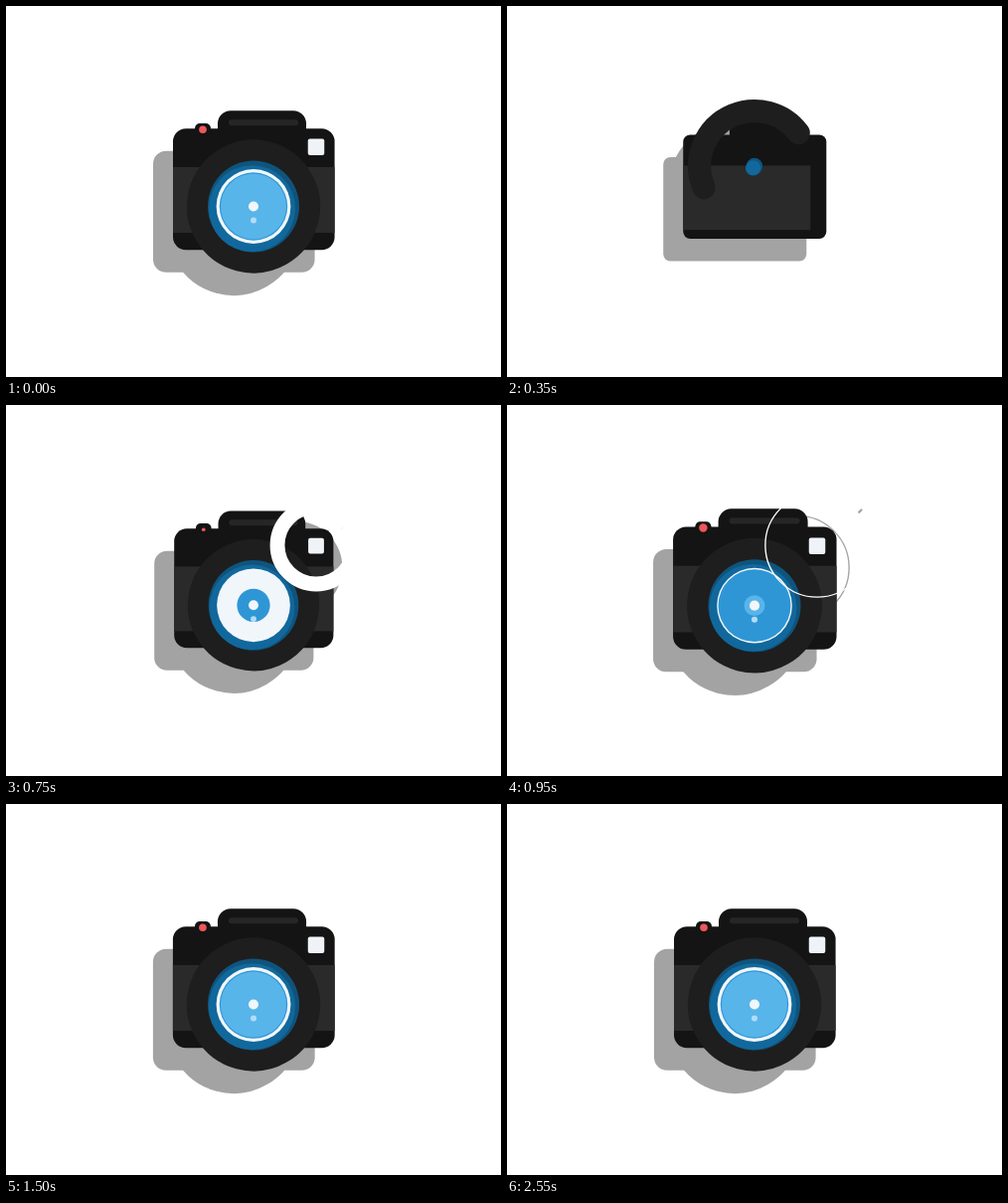
An HTML page for the animation above (2.6 s loop, 498 by 373 pixels).

```html
<!DOCTYPE html>
<html lang="en">
<head>
<meta charset="utf-8">
<title>Camera</title>
<style>
html, body { margin: 0; width: 100%; height: 100%; overflow: hidden; background: #fff; }
svg { display: block; width: 100vw; height: 100vh; }
</style>
</head>
<body>
<svg viewBox="0 0 498 373">
  <defs>
    <rect id="body" x="168" width="162.6"/>
    <g id="hump"><rect x="213" y="105.3" width="89" height="40" rx="13"/></g>
    <circle id="ring" cx="249" pathLength="360" stroke-linecap="round"/>
    <circle id="flash" cx="312" cy="141"/>
  </defs>

  <g transform="translate(-20 22.5)">
    <g class="camera" fill="#a3a3a3" stroke="none">
      <use href="#body"/>
      <use href="#hump"/>
      <use href="#ring" fill="none" stroke="#a3a3a3"/>
    </g>
    <use href="#flash" fill="none" stroke="#a3a3a3"/>
  </g>
  <path id="spark" stroke="#a3a3a3" stroke-linecap="round"/>

  <g class="camera">
    <use href="#hump" fill="#141414"/>
    <rect id="bar" x="224" y="114.3" width="70" height="6" rx="3" fill="#262626"/>
    <rect id="bump" x="190" y="118" width="16" height="14" rx="5" fill="#141414"/>
    <use href="#body" fill="#141414"/>
    <circle id="button" cx="198" cy="124.3" fill="#f0575a"/>
    <rect id="band" x="168" fill="#2a2a2a"/>
    <use href="#ring" fill="none" stroke="#1e1e1e"/>
    <g id="lens">
      <circle id="rim" fill="#0f547d"/>
      <circle id="rimLow" cx="-1.5" cy="2.2" fill="#11689c"/>
      <circle id="glass" fill="#f1f6fa"/>
      <circle id="mid" fill="#2f96d6"/>
      <circle id="light" fill="#57b5ea"/>
      <circle id="dot" fill="#f1f6fa"/>
      <circle id="dot2" cy="14" fill="#b3dcf5"/>
    </g>
  </g>
  <use href="#flash" fill="none" stroke="#fff"/>
  <rect id="window" fill="#eff3f7" rx="2"/>
</svg>
<script>
const LOOP = 2600, STEP = 50;
const $ = id => document.getElementById(id);
const cameras = document.querySelectorAll('.camera');

const linear = p => p;
const out = n => p => 1 - (1 - p) ** n;
const inOut = p => p < 0.5 ? 2 * p * p : 1 - 2 * (1 - p) ** 2;
const back = s => p => 1 + (s + 1) * (p - 1) ** 3 + s * (p - 1) ** 2;

// Eased progress from 0 to 1 that begins at start and lasts dur.
function ease(t, start, dur, curve = linear) {
  return curve(Math.min(1, Math.max(0, (t - start) / dur)));
}

const mix = (a, b, p) => a + (b - a) * p;

function set(id, attrs) {
  for (const name in attrs) $(id).setAttribute(name, attrs[name]);
}

function scaleAt(x, y, sx, sy = sx) {
  return `translate(${x} ${y}) scale(${sx} ${sy}) translate(${-x} ${-y})`;
}

function wobble(t) {
  const age = Math.max(0, t - 600);
  return 0.054 * Math.exp(-age / 235) * Math.sin(age * Math.PI / 250);
}

function drawBody(t) {
  const size = ease(t, 150, 665, back(1.55)) - wobble(t);
  cameras.forEach(c => c.setAttribute('transform', scaleAt(249, 187, size)));

  const settle = ease(t, 350, 150);
  set('body', { y: mix(122, 123.2, settle), height: mix(118, 122, settle), rx: mix(8, 13, settle) });
  set('band', {
    y: mix(157, 162, settle),
    height: mix(73, 66, settle),
    width: 162.6 * ease(t, 150, 225)
  });
  set('hump', { transform: scaleAt(257.5, 145, ease(t, 230, 145), ease(t, 230, 100)) });
  set('bar', { transform: scaleAt(224, 117, ease(t, 450, 200), 1) });
  set('bump', { transform: scaleAt(198, 127, ease(t, 550, 200, out(2))) });
  set('button', { r: 3.8 * ease(t, 700, 400, back(1.7)) });
}

function drawLens(t) {
  const cy = mix(145, 201.5, ease(t, 250, 300, inOut));
  const sweep = 360 * ease(t, 230, 260);
  const fill = ease(t, 350, 170);
  set('ring', {
    cy,
    r: mix(62.5, 46, fill),
    'stroke-width': mix(26, 42, fill),
    'stroke-dasharray': sweep < 360 ? `${sweep} 360` : 'none',
    transform: `rotate(${240 - sweep / 2} 249 ${cy})`,
    visibility: sweep > 0 ? 'visible' : 'hidden'
  });

  set('lens', { transform: `translate(249 ${cy})` });
  const rim = 46 * ease(t, 300, 250);
  const radii = {
    rim,
    rimLow: rim * 0.945,
    glass: 37.4 * ease(t, 400, 300, out(2)),
    mid: 36 * ease(t, 600, 320) - 1.8 * ease(t, 950, 250),
    light: 33 * ease(t, 850, 320),
    dot: 5 * ease(t, 620, 100),
    dot2: 3 * ease(t, 680, 70)
  };
  for (const id in radii) set(id, { r: radii[id] });
}

function drawFlash(t) {
  set('flash', {
    r: 52.3 * ease(t, 600, 410, out(3)),
    'stroke-width': 25 * (1 - ease(t, 600, 370))
  });
  const side = 16.5 * ease(t, 550, 250, out(2));
  set('window', { x: 312 - side / 2, y: 141.7 - side / 2, width: side, height: side });

  const life = ease(t, 700, 450);
  const far = 27 * out(3)(life);
  const swell = Math.sin(Math.PI * life);
  const x = 330.5 + far, y = 131.5 - far, half = 1.4 * swell;
  set('spark', {
    d: `M${x - half} ${y + half}L${x + half} ${y - half}`,
    'stroke-width': 2.2 * swell,
    visibility: swell > 0.01 ? 'visible' : 'hidden'
  });
}

function draw(ms) {
  const now = Math.floor((ms % LOOP) / STEP) * STEP;
  const t = now || LOOP;  // the loop opens on the finished camera
  drawBody(t);
  drawLens(t);
  drawFlash(t);
}

const start = performance.now();
function tick() {
  draw(performance.now() - start);
  requestAnimationFrame(tick);
}
tick();
</script>
</body>
</html>
```
